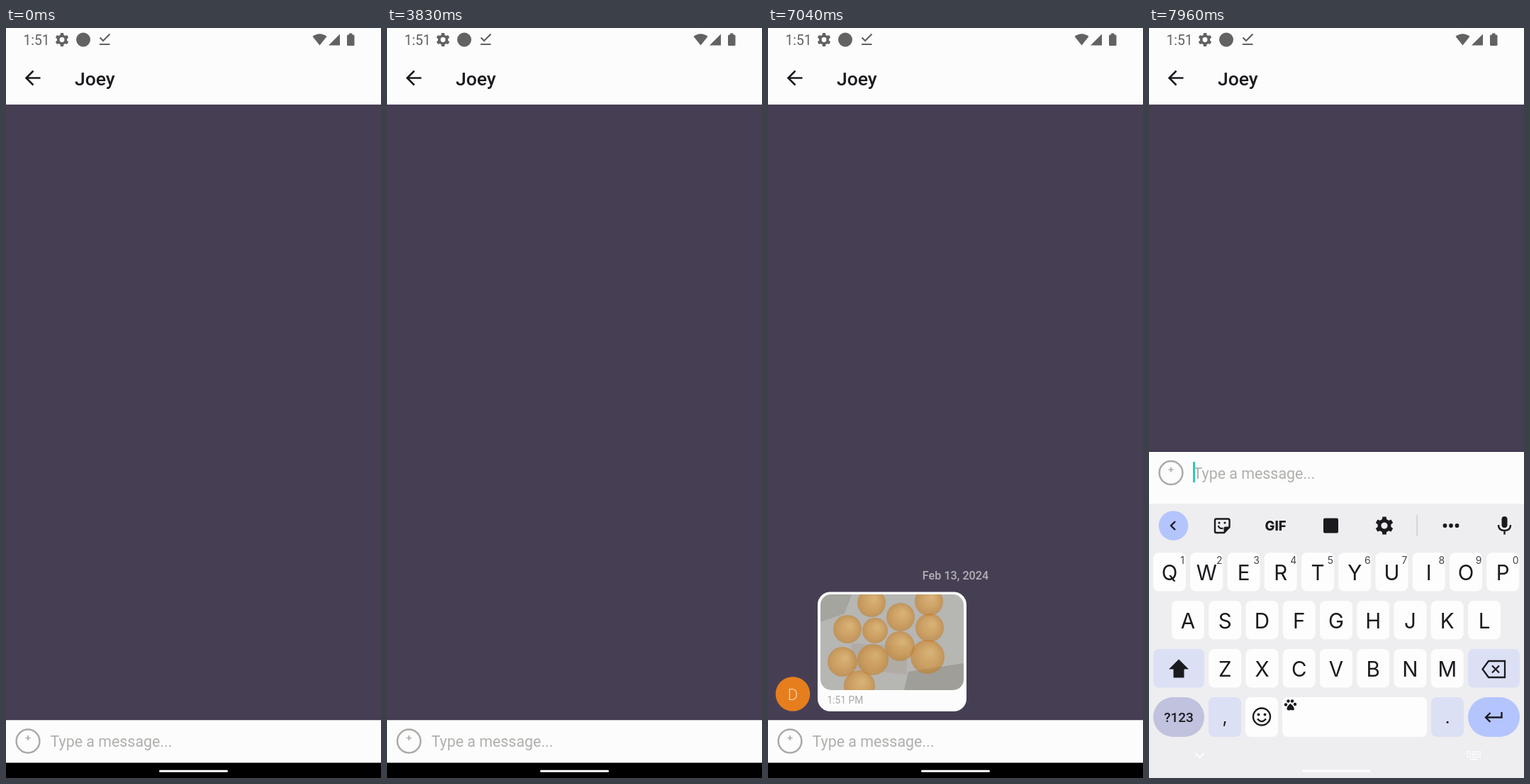
Recreate the animation shown at these times as an HTML page with a canvas. Size 529x1058 px, loop 8 s.

```html
<!DOCTYPE html>
<html lang="en">
<head>
<meta charset="utf-8">
<title>Chat</title>
<style>
html, body { margin: 0; width: 100%; height: 100%; overflow: hidden; background: #fcfcfd; }
canvas { display: block; width: 529px; height: 1058px; }
</style>
</head>
<body>
<canvas id="stage" width="529" height="1058"></canvas>
<script>
const W = 529, H = 1058, LOOP = 8000;
const stage = document.getElementById('stage').getContext('2d');
let g = stage;

const PAPER = '#fcfcfd', WALL = '#463f54', STATUS = '#626262', INK = '#1b1b1f';
const ROBOTO = 'Roboto, sans-serif', INTER = 'Inter, sans-serif';

// Times in ms
const BUBBLE_IN = 6870, BUBBLE_OUT = 7540, PHOTO_FADE = 300;
const KEYS_IN = 7760, KEYS_TIME = 200, INPUT_UP = 7870;
const KEYS_TOP = 671;

const clamp = x => Math.max(0, Math.min(1, x));
const smooth = x => x * x * (3 - 2 * x);

function box(x, y, w, h, color, r = 0) {
  g.fillStyle = color;
  g.beginPath();
  g.roundRect(x, y, w, h, r);
  g.fill();
}
function disc(x, y, r, color) {
  g.fillStyle = color;
  g.beginPath();
  g.arc(x, y, r, 0, 7);
  g.fill();
}
function ring(x, y, r, color, width) {
  g.strokeStyle = color;
  g.lineWidth = width;
  g.beginPath();
  g.arc(x, y, r, 0, 7);
  g.stroke();
}
function stroke(path, color, width, cap = 'butt') {
  g.strokeStyle = color;
  g.lineWidth = width;
  g.lineCap = cap;
  g.stroke(new Path2D(path));
}
function fill(path, color) {
  g.fillStyle = color;
  g.fill(new Path2D(path));
}
function text(s, x, y, size, color, weight = 400, family = ROBOTO, align = 'left') {
  g.font = `${weight} ${size}px ${family}`;
  g.fillStyle = color;
  g.textAlign = align;
  g.fillText(s, x, y);
}
function gear(cx, cy, r, color) {
  const teeth = 6, step = Math.PI * 2 / teeth;
  g.beginPath();
  for (let i = 0; i < teeth; i++) {
    for (const [turn, k] of [[-.33, .74], [-.2, 1], [.2, 1], [.33, .74]]) {
      const a = (i + turn) * step + Math.PI / 6 * 3;
      g.lineTo(cx + Math.cos(a) * r * k, cy + Math.sin(a) * r * k);
    }
  }
  g.closePath();
  g.moveTo(cx + r * .36, cy);
  g.arc(cx, cy, r * .36, 0, 7);
  g.fillStyle = color;
  g.fill('evenodd');
}

function header() {
  box(0, 0, W, 108, PAPER);
  text('1:51', 24.5, 23.5, 19.3, STATUS);
  gear(79, 16.5, 9.6, STATUS);
  disc(109, 16.5, 10, STATUS);
  stroke('M132.5 13.5L137 18L146.5 8.5M132 23H146.5', STATUS, 2.2);
  fill('M442.5 24.5L432.5 12Q442.5 4.5 452.5 12Z', STATUS);
  fill('M455 24.5H471V8.5Z', STATUS);
  box(481, 9.5, 10.5, 15.5, STATUS, 1.5);
  box(484, 7.5, 4.5, 3, STATUS);
  stroke('M48.5 70.5H29M38.5 60.5L28.5 70.5L38.5 80.5', INK, 2.6);
  text('Joey', 97, 80.5, 26.5, INK, 500);
}

function inputBar(top, cursor) {
  box(0, top, W, KEYS_TOP - 598, PAPER);
  const y = top + 29.5;
  ring(31, y, 16.4, '#aaaaa6', 2.5);
  stroke(`M27.5 ${y - 4.5}H34.5M31 ${y - 8}V${y - 1}`, '#aaaaa6', 1.6);
  text('Type a message...', 62.5, top + 37.8, 21.4, '#afafab');
  if (cursor) box(62, top + 14, 3, 29, '#2bcab7');
}

const fruit = [
  [146, 811, 20], [227, 809, 20], [187, 831, 20], [112, 848, 20],
  [151, 850, 18], [228, 846, 20], [186, 872, 21], [225, 887, 24],
  [105, 894, 21], [148, 891, 22], [129, 928, 22]
];

function photo(alpha) {
  g.save();
  g.beginPath();
  g.roundRect(74, 799, 202, 135, 15);
  g.clip();
  g.globalAlpha = alpha;
  box(74, 799, 202, 135, '#83827c');
  fill('M74 799H118L108 826L74 838Z', '#9a9a93');
  fill('M118 868L196 872L196 912L116 904Z', '#aca69c');
  fill('M198 908L276 896V934H192Z', '#8f8d84');
  for (const [x, y, r] of fruit) {
    const glow = g.createRadialGradient(x + r * .2, y - r * .3, 1, x, y, r);
    glow.addColorStop(0, '#f0b04c');
    glow.addColorStop(.6, '#df9128');
    glow.addColorStop(1, '#c47a1c');
    disc(x, y, r, glow);
  }
  g.restore();
}

function bubble(t) {
  text('Feb 13, 2024', 264.5, 778, 16.2, '#b2b0b3', 500, ROBOTO, 'center');
  disc(35, 939.5, 24.3, '#e67e1e');
  text('D', 35, 947.5, 22, '#f6d6b4', 300, ROBOTO, 'center');
  box(70, 795.5, 210, 168.5, PAPER, 18);
  photo(clamp((t - BUBBLE_IN) / PHOTO_FADE));
  text('1:51 PM', 83.5, 953, 13.8, '#a9a9a9');
}

function key(x, y, w, color = '#fdfdfd', r = 8) {
  box(x, y, w, y > 940 ? 56 : 54.5, color, r);
}
function keyRow(letters, left, top, digits) {
  [...letters].forEach((c, i) => {
    const x = left + i * 52.25;
    key(x, top, 46);
    text(c, x + 23, top + 38.5, 29.5, INK, 400, INTER, 'center');
    if (digits) text((i + 1) % 10, x + 41, top + 16, 14, '#45454a', 400, INTER, 'center');
  });
}

function toolbar() {
  disc(34.5, 702, 20.8, '#b4c4fd');
  stroke('M37 696L31 702L37 708', INK, 2.4);
  stroke('M95 692.5H111.5Q113.5 692.5 113.5 694.5V704L106 712H95Q93 712 93 710V694.5Q93 692.5 95 692.5Z', INK, 2.4);
  fill('M114 703.5L105.5 712.5V705.5Q105.5 703.5 107.5 703.5Z', INK);
  stroke('M97.5 702Q100 707.5 104.5 705.5', INK, 2);
  disc(99, 698, 1.6, INK);
  disc(107, 698, 1.6, INK);
  text('GIF', 178.5, 708.5, 18.5, INK, 800, INTER, 'center');
  box(246, 691.5, 21, 21, INK, 2);
  gear(332, 702, 12.8, INK);
  box(377.5, 687, 1.2, 30, '#c9c5bb');
  for (let i = 0; i < 3; i++) disc(417.5 + i * 8.5, 702, 2.9, INK);
  box(497.5, 689, 8, 16, INK, 4);
  stroke('M493 701Q493 709 501.5 709Q510 709 510 701M501.5 709V714.5', INK, 2.4);
}

function keyboard() {
  box(0, KEYS_TOP, W, H - KEYS_TOP, '#eeedf0');
  toolbar();
  keyRow('QWERTYUIOP', 6, 740, true);
  keyRow('ASDFGHJKL', 32, 808);
  keyRow('ZXCVBNM', 84.2, 876);

  const pale = '#dce0f5', blue = '#b4c4fd';
  key(6, 876, 72, pale);
  fill('M42 890.5L56 904.5H49.5V916.5H34.5V904.5H28Z', INK);
  key(450, 876, 73, pale);
  stroke('M479 893H502V916H479L470.5 904.5ZM484 899.5L494 909.5M494 899.5L484 909.5', INK, 2.3);

  key(6, 944, 72, '#c0c2de', 28);
  text('?123', 42, 979, 19, INK, 500, ROBOTO, 'center');
  key(84, 944, 46, pale);
  text(',', 107, 981, 25, INK, 400, INTER, 'center');
  key(136, 944, 46);
  ring(159, 971.5, 12, INK, 2.4);
  disc(154.5, 968.5, 1.9, INK);
  disc(163.5, 968.5, 1.9, INK);
  stroke('M153 974.5Q159 982 165 974.5', INK, 2.2);
  key(188, 944, 204);
  for (const [x, y] of [[193, 954.5], [196.5, 949.5], [202, 949.5], [206, 954]]) disc(x, y, 2.2, INK);
  fill('M199.5 953Q207 959 204 962.5Q201 962 199.5 962Q196 963.5 194.5 961Q194 957 199.5 953Z', INK);
  key(398, 944, 46, pale);
  text('.', 421, 981, 25, INK, 400, INTER, 'center');
  key(450, 944, 73, blue, 28);
  stroke('M497.5 965V972.5H475M481.5 966L475 972.5L481.5 979', INK, 2.4);

  stroke('M65.5 1023L71.5 1029L77.5 1023', '#fdfdfd', 2);
  for (let i = 0; i < 18; i++) {
    box(448 + i % 6 * 3.6, 1020 + Math.floor(i / 6) * 3.6, 2.2, 2.2, '#fdfdfd');
  }
  box(453, 1031, 10, 1.8, '#fdfdfd');
}

const layer = document.createElement('canvas');
layer.width = W;
layer.height = H;

function drawLayer() {
  g = layer.getContext('2d');
  g.clearRect(0, 0, W, H);
  keyboard();
  g = stage;
}

function draw(t) {
  box(0, 0, W, H, PAPER);
  const typing = t >= KEYS_IN, up = t >= INPUT_UP;
  const wallEnd = up ? 598 : typing ? 658 : 976.5;
  box(0, 108, W, wallEnd - 108, WALL);
  if (!typing || up) box(0, wallEnd - 2, W, 2, 'rgba(40,34,50,.22)');
  header();
  if (t >= BUBBLE_IN && t < BUBBLE_OUT) bubble(t);
  if (!typing) inputBar(976.5, false);
  if (up) inputBar(598, true);
  box(0, 1036.5, W, 21.5, '#000');
  if (typing) {
    const p = smooth(clamp((t - KEYS_IN) / KEYS_TIME));
    g.globalAlpha = Math.pow(p, 1.45);
    g.drawImage(layer, 0, (H - KEYS_TOP) * (1 - p));
    g.globalAlpha = 1;
  }
  box(216, 1046.7, 97, 3, '#fdfdfd', 1.5);
}

const start = performance.now();
function tick() {
  draw((performance.now() - start) % LOOP);
  requestAnimationFrame(tick);
}
drawLayer();
tick();
</script>
</body>
</html>
```
